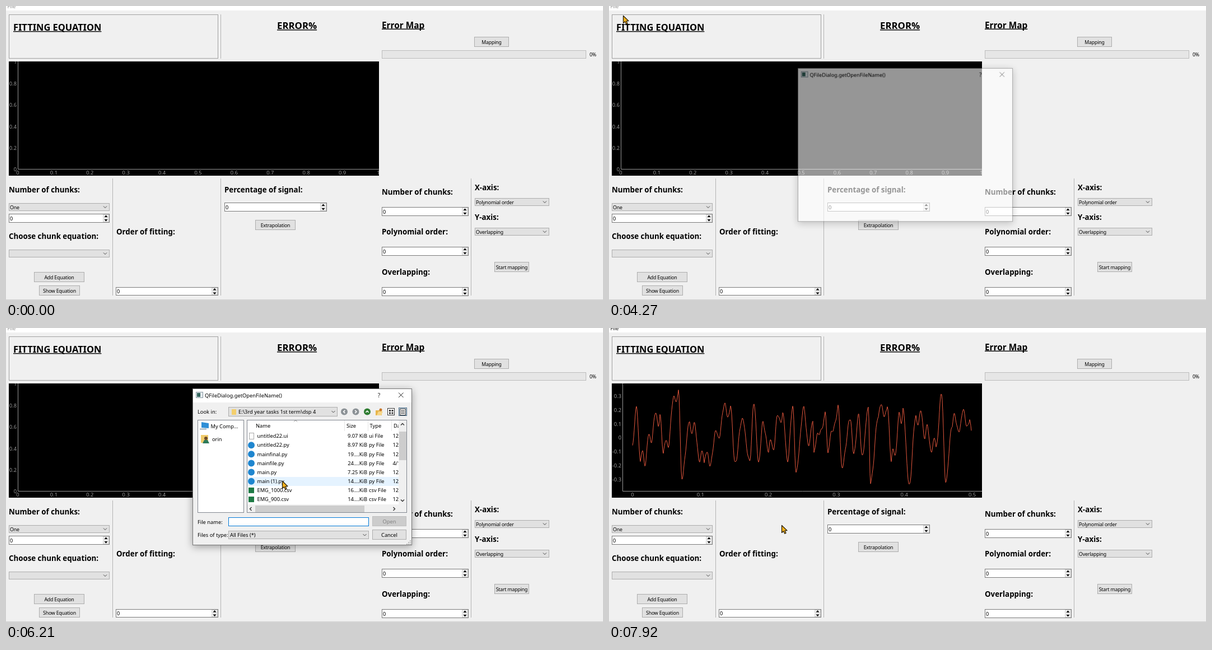
An HTML page with a canvas for the animation above (7.99 s loop, 1066 px wide and 525 px high).

```html
<!DOCTYPE html>
<html lang="en">
<head>
<meta charset="utf-8">
<title>Curve fitting window</title>
<style>
html, body { margin: 0; width: 100%; height: 100%; overflow: hidden; background: #f0f0f0; }
canvas { display: block; }
</style>
</head>
<body>
<canvas id="stage" width="1066" height="525"></canvas>
<script>
const LOOP = 7990, W = 1066, H = 525;
const stage = document.getElementById('stage').getContext('2d');
const layer = new OffscreenCanvas(W, H).getContext('2d');
let c = stage;

// ---------- drawing helpers ----------
function box(x1, y1, x2, y2, fill, border) {
  c.fillStyle = border || fill;
  c.fillRect(x1, y1, x2 - x1, y2 - y1);
  if (border) {
    c.fillStyle = fill;
    c.fillRect(x1 + 1, y1 + 1, x2 - x1 - 2, y2 - y1 - 2);
  }
}
function disc(x, y, r, fill) {
  c.fillStyle = fill;
  c.beginPath();
  c.arc(x, y, r, 0, 7);
  c.fill();
}
function poly(points, stroke, width = 1, fill) {
  c.beginPath();
  points.forEach(([x, y]) => c.lineTo(x, y));
  if (fill) { c.closePath(); c.fillStyle = fill; c.fill(); }
  if (stroke) { c.strokeStyle = stroke; c.lineWidth = width; c.stroke(); }
}
// y is the middle of the capitals
function text(s, x, y, size = 9.3, color = '#000', align = 'left', weight = 400, spacing = 0) {
  c.font = `${weight} ${size}px "Noto Sans", sans-serif`;
  c.letterSpacing = spacing + 'px';
  c.textAlign = align;
  c.fillStyle = color;
  c.fillText(s, x, y + size * 0.36);
}
const small = (s, x, y, align, color) => text(s, x, y, 8.8, color, align, 400, -0.2);
const label = (s, x, y) => text(s, x, y, 13.3, '#000', 'left', 700);
function heading(s, x, y, size) {
  text(s, x, y, size, '#000', 'left', 700);
  c.fillRect(x, y + size * 0.36 + 1, c.measureText(s).width, 1.4);
}
// dir: 0 down, 1 left, 2 up, 3 right
function chevron(x, y, dir = 0, color = '#444', r = 3, width = 1) {
  c.save();
  c.translate(x, y);
  c.rotate(dir * Math.PI / 2);
  poly([[-r, -r / 2], [0, r / 2], [r, -r / 2]], color, width);
  c.restore();
}
function button(s, x1, y1, x2, y2) {
  box(x1, y1, x2, y2, '#e1e1e1', '#adadad');
  small(s, (x1 + x2) / 2, (y1 + y2) / 2 + .5, 'center');
}
function combo(s, x1, y1, x2, y2) {
  box(x1, y1, x2, y2, '#e1e1e1', '#adadad');
  small(s, x1 + 2, (y1 + y2) / 2 + .5);
  chevron(x2 - 8, (y1 + y2) / 2);
}
function spin(x1, y1, x2, y2) {
  const m = (y1 + y2) / 2, a = x2 - 6.5;
  box(x1, y1, x2, y2, '#fff', '#7a7a7a');
  box(x2 - 12, y1 + 1, x2 - 1, m - .5, '#f0f0f0', '#d4d4d4');
  box(x2 - 12, m + .5, x2 - 1, y2 - 1, '#f0f0f0', '#d4d4d4');
  for (const d of [-1, 1])
    poly([[a - 3, m + 2 * d], [a, m + 5.5 * d], [a + 3, m + 2 * d]], 0, 0, '#000');
  text('0', x1 + 2, m + .5, 9.2);
}

// ---------- plot ----------
// main peaks of the recording; wide gaps between them get a ripple
const peaks = [
  [42, 210], [49, 140], [56, 238], [91, 155], [97, 224], [124, 109], [130, 267], [144, 167],
  [170, 241], [217, 139], [225, 242], [238, 162], [251, 238], [259, 134], [267, 240], [275, 169],
  [285, 220], [310, 150], [319, 237], [328, 139], [334, 256], [348, 143], [356, 210], [364, 167],
  [366, 223], [386, 150], [391, 223], [409, 138], [416, 248], [431, 162], [437, 225], [446, 156],
  [452, 230], [463, 143], [467, 276], [481, 158], [497, 137], [504, 237], [525, 146], [536, 281],
  [548, 156], [584, 214], [594, 117], [601, 275], [613, 173], [644, 160], [648, 190]];
const signal = [];
peaks.slice(1).forEach(([x2, y2], i) => {
  const [x1, y1] = peaks[i], gap = x2 - x1;
  const waves = Math.round(gap / 14), size = gap > 15 ? 17 * Math.sign(y2 - y1) : 0;
  for (let x = x1; x < x2; x++) {
    const k = (x - x1) / gap;
    signal.push([x, y1 + (y2 - y1) * (1 - Math.cos(Math.PI * k)) / 2
      + size * Math.sin(2 * Math.PI * waves * k)
      + 4 * Math.sin(x * .9) * Math.sin(x * .13)]);
  }
});

function plot(t) {
  const loaded = t >= 6920, settled = t >= 7000;
  const left = settled ? 24.5 : 21.5, grey = '#969696';
  c.save();
  c.beginPath();
  c.rect(5, 99, 661, 204);
  c.clip();
  box(5, 99, 666, 303, '#000');
  poly([[left, 99], [left, 291.5], [666, 291.5]], grey);
  const tickY = (s, y) => text(s, left - 2.5, y, 9.4, grey, 'right');
  const tickX = (s, x) => text(s, x, 298, 9.4, grey, 'center');
  if (!loaded) {
    for (let i = 0; i <= 10; i++) {
      const s = String(i / 10);
      tickX(s, 21 + i * 64.4);
      if (i % 2 == 0) tickY(s, 292 - i * 19.2);
    }
  } else {
    const x0 = settled ? 42 : 39, step = settled ? 121.3 : 122;
    for (let i = -3; i <= 3; i++) tickY(String(i / 10), 196 - i * 24.8);
    for (let i = 0; i <= 5; i++) tickX(String(i / 10), x0 + i * step);
    poly(signal.map(([x, y]) => [x0 + (x - 42) * step / 121.3, y]), '#e4573d');
  }
  c.restore();
}

// ---------- main window ----------
function mainWindow(t) {
  box(0, 0, W, H, '#f0f0f0');
  box(0, 0, W, 8, '#fff');
  box(0, 524, W, H, '#cfcfcf');
  const hot = t >= 1850 && t < 4120;
  if (hot) box(0, 0, 21, 8, t < 2380 ? '#e5f3ff' : '#cce8ff');
  text('File', 2.5, 1, 9.3, hot ? '#7fb8e4' : t < 6920 ? '#909090' : '#111');

  box(5, 15, 379, 94, '#f0f0f0', '#a0a0a0');
  box(383, 15, 384, 94, '#b4b4b4');
  for (const x of [190, 383, 830]) box(x, 308, x + 1, 517, '#b4b4b4');
  heading('FITTING EQUATION', 13, 38, 16.4);
  heading('ERROR%', 484, 35, 16.8);
  heading('Error Map', 671, 34, 15.4);
  button('Mapping', 836, 55, 898, 73);
  box(671, 79, 1036, 94, '#e6e6e6', '#bcbcbc');
  small('0%', 1042, 87);

  plot(t);

  label('Number of chunks:', 5, 328);
  combo('One', 5, 352, 185, 366);
  spin(5, 371, 185, 387);
  label('Choose chunk equation:', 5, 411.5);
  combo('', 5, 435, 185, 449);
  button('Add Equation', 50, 475, 140, 493);
  button('Show Equation', 59, 499, 132, 517);
  label('Order of fitting:', 197, 403);
  spin(196, 502, 379, 517);
  label('Percentage of signal:', 390, 328);
  spin(390, 351, 573, 367);
  button('Extrapolation', 445, 382, 517, 400);
  ['Number of chunks:', 'Polynomial order:', 'Overlapping:'].forEach((s, i) => {
    const y = 332 + i * 71.4, top = Math.round(y + 27);
    label(s, 671, y);
    spin(671, top, 826, top + 16);
  });
  label('X-axis:', 837, 324);
  combo('Polynomial order', 837, 343, 970, 357);
  label('Y-axis:', 837, 377);
  combo('Overlapping', 837, 396, 970, 410);
  button('Start mapping', 872, 457, 934, 475);
}

function menu(t) {
  if (t < 2380 || t >= 4120) return;
  c.save();
  c.globalAlpha = t < 2455 ? .4 : t < 2530 ? .8 : 1;
  box(4, 12, 64, 38, 'rgba(0,0,0,.18)');
  box(0, 8, 60, 34, '#f2f2f2', '#b8b8b8');
  if (t >= 3390) box(2, 10, 58, 32, '#91c9f7');
  text('Open', 26, 21);
  c.restore();
}

// ---------- file dialog ----------
const files = [
  ['untitled22f.py', '12....KiB'], ['untitled22.ui', '9.07 KiB'], ['untitled22.py', '8.97 KiB'],
  ['mainfinal.py', '19....KiB'], ['mainfile.py', '24....KiB'], ['main.py', '7.25 KiB'],
  ['main (1).py', '14....KiB'], ['EMG_1000.csv', '16....KiB'], ['EMG_900.csv', '14....KiB']];
const ROW = 16.15, TOP = 185;

function fileIcon(type, y) {
  if (type == 'py') disc(438, y, 6, '#1f86cf');
  else if (type == 'csv') box(433, y - 5, 443, y + 5, '#1f7a45');
  else box(434, y - 6, 443, y + 6, '#fff', '#a8a8a8');
}

function fileList(t, pointer) {
  const first = t >= 5740 ? 1 : 0, picked = t >= 6740;
  box(430, 164, 716, 330, '#fff', '#828790');
  for (const x of [604, 646, 688]) box(x, 165, x + 1, 184, '#e5e5e5');
  chevron(517, 166, 2, '#666', 3, .8);
  [['Name', 446], ['Size', 608], ['Type', 649.5], ['Dat', 692]].forEach(([s, x]) => text(s, x, 174.5));
  const inside = pointer[0] > 431 && pointer[0] < 701;
  const hover = inside ? Math.floor((pointer[1] - TOP) / ROW) : -1;
  for (let i = 0; i < 8; i++) {
    const [name, size] = files[first + i], type = name.split('.')[1];
    const y1 = TOP + i * ROW, y = y1 + 8;
    if (i == hover)
      box(431, Math.round(y1), 701, Math.round(y1 + ROW), picked ? '#cce8ff' : '#e5f3ff', picked && '#99d1ff');
    fileIcon(type, y);
    text(name, 448.5, y);
    text(size, 645, y, 9.3, '#000', 'right');
    text(type + ' File', 648, y);
    text(name == 'mainfile.py' ? '4/1' : '12/', 690.5, y);
  }
  box(701, 165, 715, 329, '#f0f0f0');
  box(431, 315, 715, 329, '#f0f0f0');
  const thumb = first ? 185 : 178;
  box(702, thumb, 715, thumb + 51, '#cdcdcd');
  box(445, 317, 640, 329, '#cdcdcd');
  chevron(708, 172, 2, '#333', 3, 1.4);
  chevron(708, 308, 0, '#333', 3, 1.4);
  chevron(437, 323, 1, '#333', 3, 1.4);
  chevron(693, 323, 3, '#333', 3, 1.4);
}

function toolIcons() {
  [[1, '#8c9296'], [3, '#8c9296'], [2, '#2f7d32']].forEach(([dir, color], i) => {
    const x = 604 + i * 20.5;
    disc(x, 149.5, 6, color);
    chevron(x, 149.5, dir, '#fff', 2.6, 1.6);
  });
  box(660, 147, 671, 156, '#e8b64c');
  poly([[662, 156], [665, 149], [673, 149], [670, 156]], 0, 0, '#f6d68a');
  disc(669, 146, 2.5, '#c8772a');
  box(681, 143, 694, 156, '#fff', '#333');
  for (const x of [684, 688.5]) for (const y of [146, 150.5]) box(x, y, x + 3, y + 3, '#333');
  box(701, 142, 716, 157, '#cfe3f3', '#4a6a84');
  box(703, 144, 714, 156, '#fff', '#333');
  for (let y = 147; y < 153; y += 2.5) box(705, y, 712, y + 1, '#333');
}

function dialogBody(t, pointer) {
  const picked = t >= 6740;
  box(333, 133, 725, 388, '#f0f0f0');
  text('Look in:', 342, 150);
  box(397, 141, 592, 158, '#e1e1e1', '#adadad');
  box(403, 145, 411, 155, '#f3cf6d');
  text('E:\\3rd year tasks 1st term\\dsp 4', 415, 150);
  chevron(584.5, 149.5);
  toolIcons();

  box(342, 164, 425, 330, '#fff', '#828790');
  poly([[349, 168], [362, 170], [362, 179], [349, 178]], 0, 0, '#2f8fd6');
  box(346, 179, 358, 182, '#b8c4cc');
  text('My Comp...', 365.5, 176);
  box(348, 191, 361, 205, '#f0cb6b');
  disc(357, 197, 3, '#6b4a2c');
  poly([[351, 206], [354, 200], [360, 200], [363, 206]], 0, 0, '#2c7a5a');
  text('orin', 368, 198.5);

  fileList(t, pointer);

  text('File name:', 342, 346.5);
  box(397, 338, 648, 354, '#fff', picked ? '#7a7a7a' : '#0078d7');
  if (picked) text('EMG_1000.csv', 399.5, 346);
  else if (t < 4690 || (t >= 5270 && t < 5740) || t >= 6330) box(399, 341, 400, 352, '#000');
  box(654, 336, 715, 354, picked ? '#e1e1e1' : '#cccccc', picked ? '#0078d7' : '#bfbfbf');
  text('Open', 684.5, 345.5, 9.3, picked ? '#000' : '#838383', 'center');
  text('Files of type:', 342, 370);
  box(397, 362, 648, 377, '#e1e1e1', '#adadad');
  text('All Files (*)', 400, 370);
  chevron(640.5, 369.5);
  box(654, 360, 715, 378, '#e1e1e1', '#adadad');
  text('Cancel', 684.5, 369.5, 9.3, '#000', 'center');
  for (let i = 0; i < 3; i++)
    for (let j = 0; j <= i; j++) box(721 - j * 3, 379 + i * 3, 723 - j * 3, 381 + i * 3, '#b8b8b8');
}

function dialogFrame() {
  c.save();
  c.shadowColor = 'rgba(0,0,0,.35)';
  c.shadowBlur = 13;
  c.shadowOffsetY = 3;
  box(333, 108, 725, 388, '#777');
  c.restore();
  box(333, 108, 725, 388, '#fff', '#777');
  box(339, 114, 352, 125, '#e4eaee', '#8a9aa4');
  box(341, 116, 347, 123, '#35665e');
  text('QFileDialog.getOpenFileName()', 355, 120.5);
  text('?', 666, 120, 10.5, '#222', 'center');
  poly([[701, 115.5], [709.5, 124]], '#222');
  poly([[709.5, 115.5], [701, 124]], '#222');
}

// start time, opacity, scale
const fades = [[4190, .25, .96], [4270, .59, .98], [4350, .9, .995], [4430, 1, 1],
               [6920, .68, .985], [7000, .25, .96], [7070, 0, 1]];

function dialog(t, pointer) {
  const fade = fades.findLast(f => t >= f[0]);
  if (!fade || !fade[1]) return;
  const [, alpha, scale] = fade, closing = t >= 6920;
  c = layer;
  c.clearRect(0, 0, W, H);
  if (closing) box(326, 107, 732, 393, '#fff');
  else dialogFrame();
  if (t >= 4350) dialogBody(t, pointer);
  if (!closing) {
    c.strokeStyle = '#777';
    c.lineWidth = 1;
    c.strokeRect(333.5, 108.5, 391, 279);
  }
  c = stage;
  c.save();
  c.globalAlpha = alpha;
  c.translate(529, 248);
  c.scale(scale, scale);
  c.drawImage(layer.canvas, -529, -248);
  c.restore();
}

// ---------- pointer ----------
// first step time, last step time, steps, end x, end y
const moves = [
  [290, 290, 1, 691, 416], [365, 440, 2, 491, 296], [670, 900, 4, 18, 78],
  [1140, 1930, 11, 8, 5], [3160, 3240, 2, 18, 8], [3390, 3630, 4, 14, 7],
  [3940, 3940, 1, 24, 10], [4120, 4120, 1, 25, 17], [4640, 5050, 6, 477, 209],
  [5110, 5110, 1, 484, 236], [6070, 6210, 3, 493, 273], [6290, 6510, 4, 491, 288],
  [7680, 7920, 4, 308, 352]];

function pointerAt(t) {
  let p = [691, 416];
  for (const [t1, t2, n, x, y] of moves) {
    if (t < t1) break;
    const gap = (t2 - t1) / (n - 1) || 1;
    const k = Math.min(n, Math.floor((t - t1) / gap + 1e-6) + 1) / n;
    p = [p[0] + (x - p[0]) * k, p[1] + (y - p[1]) * k];
  }
  return p;
}

function drawPointer([x, y]) {
  const shape = [[.5, .5], [.5, 13.5], [3.6, 10.8], [5.8, 15.3], [8, 14.2], [6, 9.8], [10, 9.6]];
  c.save();
  c.translate(x, y);
  c.lineJoin = 'round';
  poly([...shape, shape[0]], '#1c1608', 1.2, '#f6b21c');
  c.restore();
}

const start = performance.now();
function draw() {
  const t = (performance.now() - start) % LOOP, pointer = pointerAt(t);
  mainWindow(t);
  menu(t);
  dialog(t, pointer);
  if (t >= 290) drawPointer(pointer);
  requestAnimationFrame(draw);
}
draw();
</script>
</body>
</html>
```
